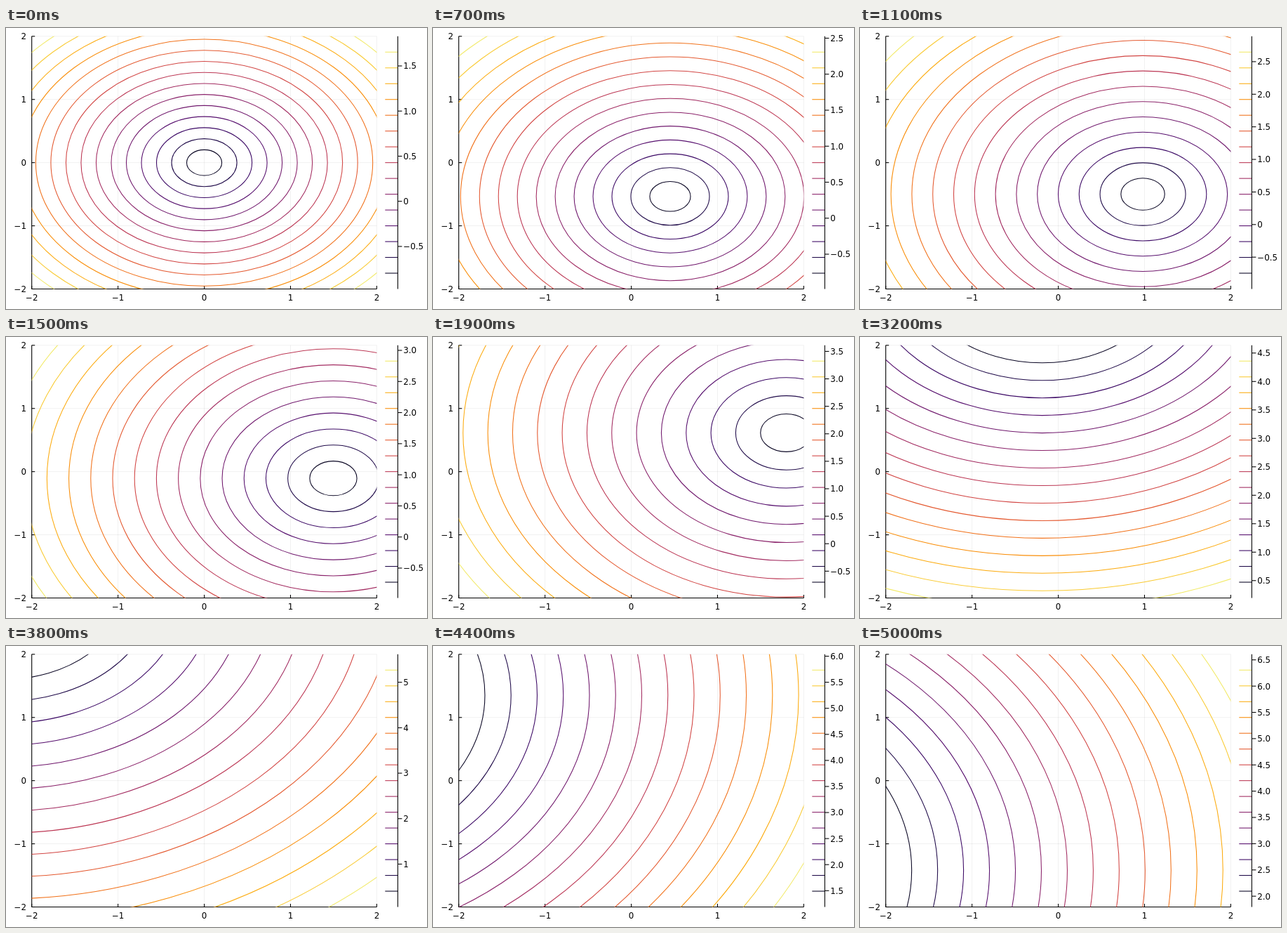
An HTML page with a canvas for the animation above (5100 ms loop, 600 px wide and 400 px high).

```html
<!DOCTYPE html>
<html lang="en">
<head>
<meta charset="utf-8">
<title>Moving contour plot</title>
<style>
  html, body { margin: 0; width: 100%; height: 100%; overflow: hidden; background: #fff; }
  canvas { display: block; width: 600px; height: 400px; }
</style>
</head>
<body>
<canvas id="stage" width="600" height="400"></canvas>
<script>
const ctx = document.getElementById('stage').getContext('2d');
const STEPS = 51, STEP_MS = 100;
const LEFT = 36.7, RIGHT = 528.4, TOP = 11.8, BOTTOM = 371.5;
const BAR_LEFT = 540.3, BAR_RIGHT = 558.4;
const UNIT_X = (RIGHT - LEFT) / 4, UNIT_Y = (BOTTOM - TOP) / 4;
const GRID_POINTS = 100;
const TICKS = [-2, -1, 0, 1, 2];

// Inferno colour map at 1/16 ... 15/16
const COLORS = ('0b0724 210c4a 3c0965 57106e 711a6e 8a226a a32c61 bc3754 ' +
  'd24644 e45a31 f1731d f98e09 fcac11 f9cb35 f2ea69').split(' ').map(c => '#' + c);

const samples = Array.from({ length: GRID_POINTS }, (_, i) => -2 + 4 * i / (GRID_POINTS - 1));
const toX = x => LEFT + (x + 2) * UNIT_X;
const toY = y => BOTTOM - (y + 2) * UNIT_Y;

function line(x1, y1, x2, y2, color = '#000', width = 1.08) {
  ctx.strokeStyle = color;
  ctx.lineWidth = width;
  ctx.beginPath();
  ctx.moveTo(x1, y1);
  ctx.lineTo(x2, y2);
  ctx.stroke();
}

function label(text, x, y, align) {
  ctx.textAlign = align;
  ctx.fillText(String(text).replace('-', '\u2212'), x, y);
}

function drawAxes() {
  for (const v of TICKS) {
    line(toX(v), TOP, toX(v), BOTTOM, 'rgba(0,0,0,0.1)', 0.6);
    line(LEFT, toY(v), RIGHT, toY(v), 'rgba(0,0,0,0.1)', 0.6);
  }
  line(LEFT, BOTTOM, RIGHT, BOTTOM);
  line(LEFT, TOP, LEFT, BOTTOM);
  for (const v of TICKS) {
    line(toX(v), BOTTOM, toX(v), BOTTOM - 4.5);
    line(LEFT, toY(v), LEFT + 4.5, toY(v));
    label(v, toX(v), 387.6, 'center');
    label(v, 29, toY(v) + 4.4, 'right');
  }
}

function drawContours(cx, cy, levels) {
  ctx.save();
  ctx.beginPath();
  ctx.rect(LEFT, TOP, RIGHT - LEFT, BOTTOM - TOP);
  ctx.clip();
  ctx.lineWidth = 1.08;
  levels.forEach((level, i) => {
    const r = level + 1;
    ctx.strokeStyle = COLORS[i];
    ctx.beginPath();
    ctx.ellipse(toX(cx), toY(cy), r * UNIT_X, r * UNIT_Y, 0, 0, 2 * Math.PI);
    ctx.stroke();
  });
  ctx.restore();
}

function drawColorbar(low, high, levels) {
  const range = high - low;
  const barY = v => BOTTOM - (v - low) / range * (BOTTOM - TOP);
  levels.forEach((level, i) => line(BAR_LEFT, barY(level), BAR_RIGHT, barY(level), COLORS[i]));
  line(BAR_RIGHT, TOP, BAR_RIGHT, BOTTOM);
  const step = range > 5 ? 1 : 0.5;
  for (let v = Math.ceil(low / step) * step; v <= high; v += step) {
    line(BAR_RIGHT, barY(v), BAR_RIGHT + 6, barY(v));
    const text = v === 0 ? '0' : v.toFixed(step < 1 ? 1 : 0);
    label(text, 566.3, barY(v) + 4.4, 'left');
  }
}

function draw(t) {
  const cx = t * Math.sin(t), cy = -t * Math.cos(t);
  const dx = samples.map(x => Math.abs(x - cx));
  const dy = samples.map(y => Math.abs(y - cy));
  const low = Math.hypot(Math.min(...dx), Math.min(...dy)) - 1;
  const high = Math.hypot(Math.max(...dx), Math.max(...dy)) - 1;
  const levels = COLORS.map((_, i) => low + (high - low) * (i + 1) / 16);

  ctx.fillStyle = '#fff';
  ctx.fillRect(0, 0, 600, 400);
  ctx.fillStyle = '#000';
  ctx.font = '11.85px "DejaVu Sans", sans-serif';
  drawAxes();
  drawContours(cx, cy, levels);
  drawColorbar(low, high, levels);
}

const start = performance.now();
function tick() {
  const elapsed = Math.max(0, performance.now() - start);
  draw(Math.floor(elapsed / STEP_MS) % STEPS / 10);
  requestAnimationFrame(tick);
}
tick();
</script>
</body>
</html>
```
